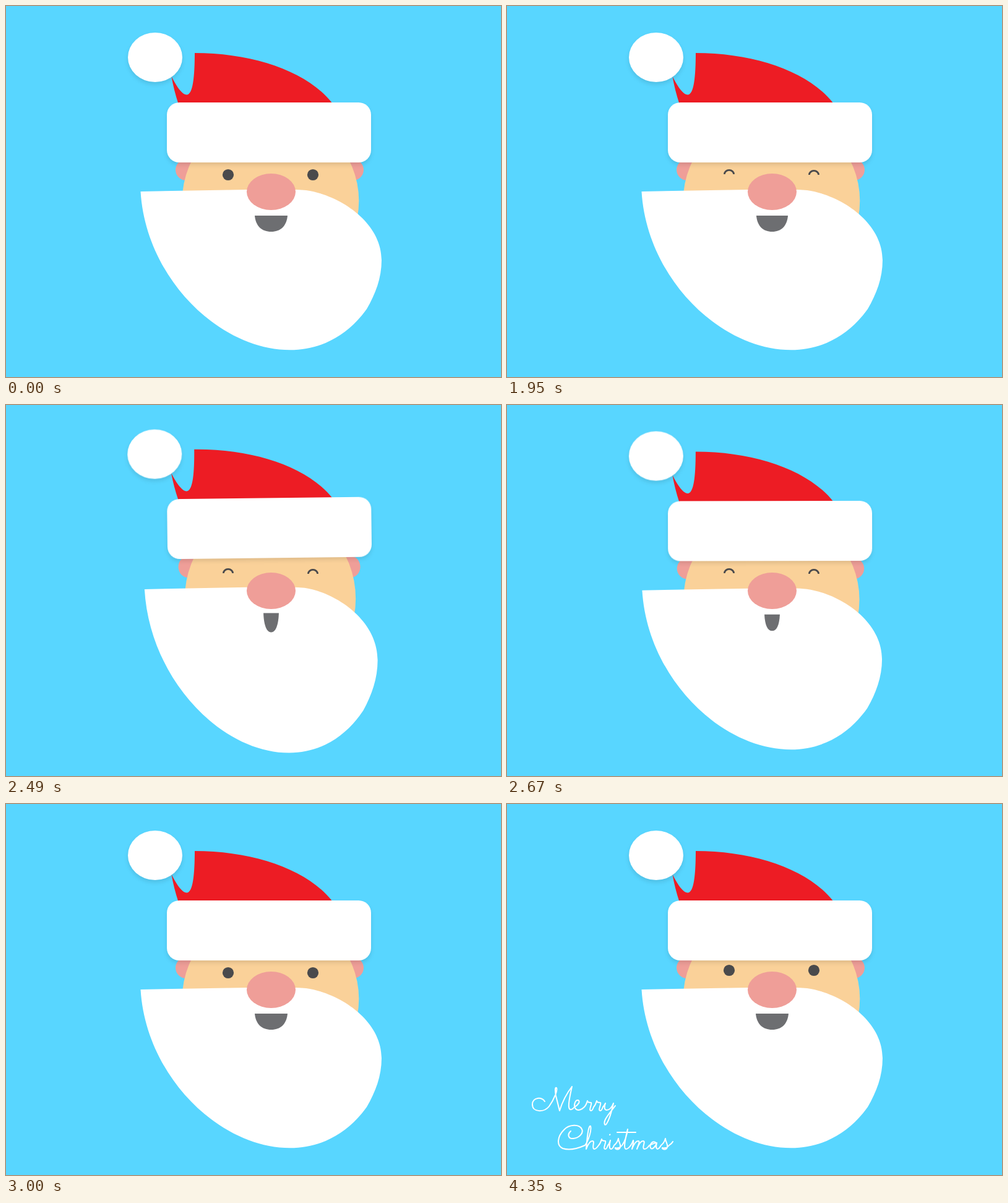
Animation of 800 by 600 pixels, one loop 4920 ms. Source, as an HTML page:

```html
<!DOCTYPE html>
<html lang="en">
<head>
<meta charset="utf-8">
<title>Merry Christmas</title>
<style>
  html, body { margin: 0; width: 100%; height: 100%; overflow: hidden; background: #58d6ff; }
  svg { display: block; width: 100vw; height: 100vh; }
  .fluff { fill: #fff; filter: drop-shadow(0 4px 3px rgba(0, 0, 0, .1)); }
  .ink { fill: none; stroke: #fff; stroke-width: 2; stroke-linecap: round; stroke-linejoin: round; }
</style>
</head>
<body>
<svg viewBox="0 0 800 600" role="img" aria-label="Merry Christmas">
  <g id="face">
    <g fill="#ef9e98">
      <circle cx="291" cy="265" r="17"/>
      <circle cx="561" cy="265" r="17"/>
    </g>
    <circle cx="427.5" cy="315" r="142.8" fill="#fad199"/>
    <path fill="#fff" d="M217.5 300L389 297Q450 295 485 298C540 306 607 350 607 411
      C607 440 597 466 583 490C553 532 510 556.3 459 556.3C345 556.3 226 440 217.5 300Z"/>
  </g>
  <g id="hat">
    <path fill="#ed1c24" d="M305 76C400 76 488 106 528 158H278.5Q271 135 267.5 114
      C274 127 284 143.5 292 143.5C302 143.5 305 115 305 76Z"/>
    <ellipse class="fluff" cx="241" cy="83" rx="44" ry="40"/>
    <rect class="fluff" x="260" y="156" width="330" height="97" rx="20"/>
  </g>
  <g id="openEyes" fill="#4a4a4c">
    <circle cx="359" r="9.1"/>
    <circle cx="496" r="9.1"/>
  </g>
  <g id="happyEyes" fill="none" stroke="#4a4a4c" stroke-width="2.8">
    <path d="M351.4 272a7.6 6.6 0 0 1 15.2 0M488.4 273a7.6 6.6 0 0 1 15.2 0"/>
  </g>
  <path id="mouth" fill="#6d6e71" d="M-26.5 -13H26.5C25 4 15 13 0 13C-15 13 -25 4 -26.5 -13Z"/>
  <ellipse cx="428.5" cy="300.5" rx="39.5" ry="29.5" fill="#ef9e98"/>
  <g id="greeting" class="ink"></g>
</svg>
<script>
const LOOP = 4920, STEP = 30;
const LAUGH = 1950, BEATS = 2100, BEAT = 300, REST = 3000;
const $ = id => document.getElementById(id);

// Cursive letters as relative curves; each starts and ends at joining height.
const glyph = {
  e: "c6-3 10-9 6-11c-5-1-8 9-4 14c4 4 10 1 14-3",
  r: "c3-3 4-7 5-10c0 4 5 2 6 3c2 2-5 13 0 13c2 0 3-3 4-6",
  y: "c2-2 3-4 4-6c-2 6-2 11 2 11c5 0 9-6 11-11c-2 9-7 27-11 33c-3 5-5-1-2-7c4-8 11-15 16-22",
  h: "c6-8 11-25 9-31c-4-2-6 25-7 37c3-8 6-13 10-13c5 0-2 12 3 13c3 0 5-3 7-6",
  i: "c2-2 3-5 4-8c-1 5-3 13 1 14c2 0 4-3 5-6",
  s: "c4-3 6-7 7-11c0 6 6 11 2 16c-3 3-8 1-7-1c3 1 8 0 11-4",
  t: "c4-6 8-17 9-26c-2 9-8 30-3 32c3 0 6-3 8-6",
  m: "c2-3 3-5 4-8c1 3-1 10-2 14c3-8 6-13 10-13c4 0-1 9-2 13c3-8 6-13 10-13c5 0-3 12 2 13c3 0 6-3 8-6",
  a: "c5-2 9-4 11-4c-6-5-11 3-9 8c2 5 9-3 10-8c-1 5-2 9 1 10c3 0 4-3 6-6"
};
const join = letters => [...letters].map(c => glyph[c]).join("");
const bigM = "M61 481C57 473 41 474 41 486C41 499 60 499 68 489C76 478 82 463 80 459" +
  "C77 457 78 466 79 472L85 496C90 480 98 466 105 457C102 470 99 483 100 490C101 497 106 494 109 490";
const bigC = "M103 529C97 534 99 542 107 541C117 540 124 532 121 526C117 517 100 518 92 527" +
  "C82 537 79 552 90 557C102 561 117 556 126 552";

const strokes = [
  [bigM + join("erry"), 3120, 3760],
  [bigC + join("hristmas") + "c3-2 5-4 6-6", 3680, 4250],
  ["M166 535l.5-.5", 4150, 4180],
  ["M178 531H208", 4230, 4350]
].map(([d, from, to]) => {
  const path = document.createElementNS("http://www.w3.org/2000/svg", "path");
  path.setAttribute("d", d);
  path.setAttribute("pathLength", 1);
  $("greeting").append(path);
  return { path, from, to };
});

const progress = (t, from, to) => Math.min(1, Math.max(0, (t - from) / (to - from)));
const ease = (t, from, to) => (1 - Math.cos(Math.PI * progress(t, from, to))) / 2;
const place = (id, transform) => $(id).setAttribute("transform", transform);
const show = (node, on) => node.setAttribute("visibility", on ? "visible" : "hidden");
const scaleAt = (x, y, sx, sy) => `translate(${x} ${y}) scale(${sx} ${sy}) translate(${-x} ${-y})`;

function drawEyes(t) {
  const laughing = t >= LAUGH && t < REST;
  const local = t < REST ? t : t - REST;
  const closed = ease(local, 150, 300) - ease(local, 450, 600);
  const y = 273 - 4 * ease(local, 750, 900);
  show($("openEyes"), !laughing);
  show($("happyEyes"), laughing);
  place("openEyes", `translate(0 ${y}) scale(1 ${1 - .9 * closed})`);
}

function drawLaugh(t) {
  const beat = (t - BEATS) / BEAT;
  const swing = t > BEATS && t < REST ? Math.sin(Math.PI * beat) ** 2 : 0;
  const tilt = Math.floor(beat) % 2 ? -swing : swing;
  const narrow = ease(t, LAUGH - STEP, BEATS) - ease(t, REST - 150, REST);
  place("face", scaleAt(412.5, 364.5, 1 - .05 * swing, 1 + .05 * swing));
  place("hat", `translate(0 ${-8 * swing}) rotate(${tilt} 393.5 148)`);
  place("mouth", `translate(428.5 352) scale(${1 - .53 * narrow} ${1 + .3 * swing})`);
}

function drawGreeting(t) {
  for (const { path, from, to } of strokes) {
    const done = progress(t, from, to);
    show(path, done > 0);
    path.setAttribute("stroke-dasharray", done < 1 ? `${done} 2` : "none");
  }
}

function render(time) {
  const t = Math.floor(time % LOOP / STEP) * STEP;
  drawEyes(t);
  drawLaugh(t);
  drawGreeting(t);
}

function tick() {
  render(performance.now());
  requestAnimationFrame(tick);
}
tick();
</script>
</body>
</html>
```
